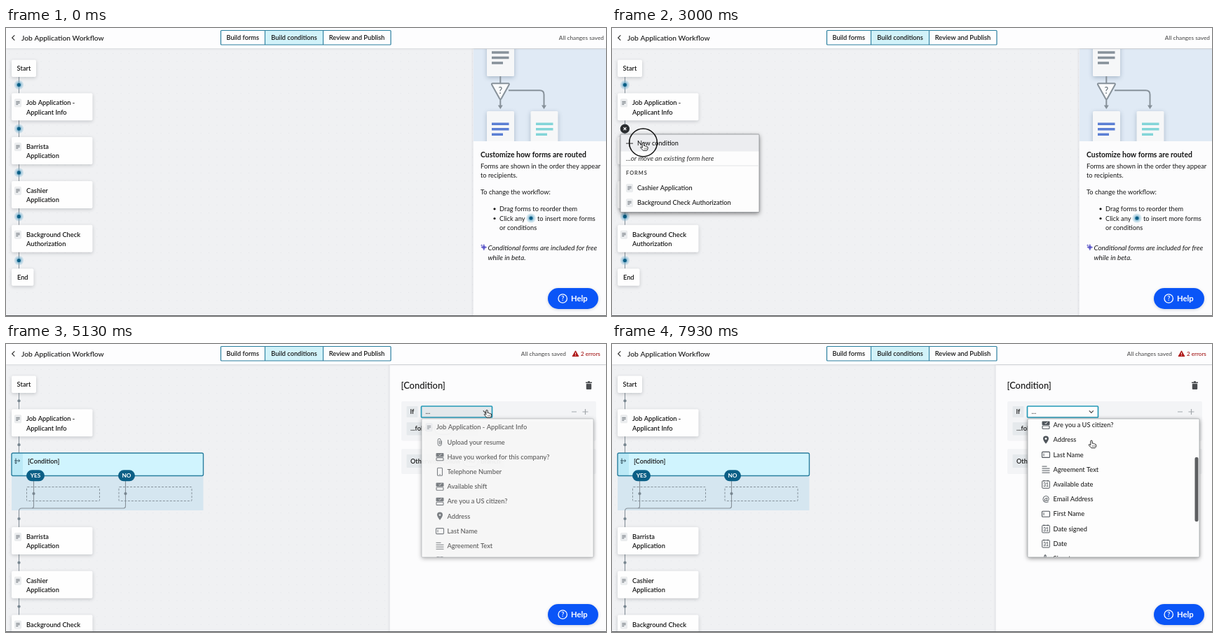
An HTML page with a canvas for the animation above (8 s loop, 856 px wide and 412 px high).

```html
<!DOCTYPE html>
<html lang="en">
<head>
<meta charset="utf-8">
<title>Form workflow</title>
<style>
html, body { margin: 0; width: 100%; height: 100%; overflow: hidden; background: #f0f1f3; }
canvas { display: block; width: 856px; height: 412px; }
</style>
</head>
<body>
<canvas id="stage"></canvas>
<script>
const W = 856, H = 412, LOOP = 8000;
const canvas = document.getElementById('stage');
const ratio = window.devicePixelRatio || 1;
canvas.width = W * ratio;
canvas.height = H * ratio;
const c = canvas.getContext('2d');

const INK = '#151515', GREY = '#87919a', TEAL = '#0b5f86', EDGE = '#2a7f9f';
const ROW = 21.2;
const clamp = v => Math.min(1, Math.max(0, v));
const smooth = v => v * v * (3 - 2 * v);
const progress = (t, from, to) => clamp((t - from) / (to - from));

// Interpolates between keys of the form [time, ...values].
function track(t, keys, ease = smooth) {
  const i = keys.findIndex(k => k[0] > t);
  if (i === 0) return keys[0].slice(1);
  if (i < 0) return keys[keys.length - 1].slice(1);
  const a = keys[i - 1], b = keys[i], p = ease(progress(t, a[0], b[0]));
  return a.slice(1).map((v, n) => v + (b[n + 1] - v) * p);
}

const POINTER = [[600, -10, 250], [1400, 17, 144], [2040, 17, 144], [2670, 44.5, 164.5],
  [3870, 44.5, 164.5], [4700, 686, 94.5], [5600, 686, 94.5], [6300, 682, 122],
  [7200, 682, 122], [7800, 684, 138]];
const SCROLL = [[6900, 0], [7130, 32.7], [7700, 106], [7930, 109.2]];
const CLICKS = [1600, 2990, 4860];

function text(str, x, cy, size = 9.25, weight = 400, color = INK, align = 'left') {
  c.font = `${weight} ${size}px Lato, sans-serif`;
  c.fillStyle = color;
  c.textAlign = align;
  c.fillText(str, x, cy + size * 0.34);
}
function box(x, y, w, h, fill, r = 0, stroke, lw = 1) {
  c.beginPath();
  c.roundRect(x, y, w, h, r);
  if (fill) { c.fillStyle = fill; c.fill(); }
  if (stroke) { c.strokeStyle = stroke; c.lineWidth = lw; c.stroke(); }
}
function shadowed(x, y, w, h, fill, r, color, blur, dy) {
  c.save();
  c.shadowColor = color;
  c.shadowBlur = blur * ratio;
  c.shadowOffsetY = dy * ratio;
  box(x, y, w, h, fill, r);
  c.restore();
}
function path(d, stroke, lw = 1, fill) {
  const p = new Path2D(d);
  if (fill) { c.fillStyle = fill; c.fill(p); }
  if (stroke) { c.strokeStyle = stroke; c.lineWidth = lw; c.stroke(p); }
}
function disc(x, y, r, fill, stroke, lw = 1) {
  c.beginPath();
  c.arc(x, y, r, 0, Math.PI * 2);
  if (fill) { c.fillStyle = fill; c.fill(); }
  if (stroke) { c.strokeStyle = stroke; c.lineWidth = lw; c.stroke(); }
}
function at(x, y, draw) {
  c.save();
  c.translate(x, y);
  draw();
  c.restore();
}
function faded(alpha, draw) {
  if (alpha <= 0) return;
  c.save();
  c.globalAlpha = alpha;
  draw();
  c.restore();
}

function formIcon(x, y) {
  box(x - 4.5, y - 5.5, 9, 11, '#eceef0', 1, '#dfe2e5', 0.6);
  path(`M${x - 2.7} ${y - 2}h5.4M${x - 2.7} ${y}h5.4M${x - 2.7} ${y + 2}h3`, '#5c646b', 0.9);
}
function insertDot(x, y) {
  disc(x, y, 6.6, 'rgba(120,180,208,.32)');
  disc(x, y, 4.5, 'rgba(90,160,195,.4)');
  disc(x, y, 2.6, TEAL);
}
function card(y, lines) {
  shadowed(8, y, 115.5, 39, '#fefefe', 2, 'rgba(40,50,60,.22)', 5, 1.5);
  formIcon(17, y + 14);
  lines.forEach((line, i) => text(line, 29, y + 14 + i * 13.2, 9.3, 600));
}
function endCap(label, y, w) {
  shadowed(8, y, w, 24.5, '#fefefe', 2, 'rgba(40,50,60,.22)', 5, 1.5);
  text(label, 8 + w / 2, y + 12.3, 9.3, 600, INK, 'center');
}
function pill(label, x, y, w, fill, stroke, color) {
  box(x - w / 2, y - 8, w, 16, fill, 8, stroke, 1);
  text(label, x, y, 8.3, 700, color, 'center');
}

function backdrop() {
  c.fillStyle = '#f0f1f3';
  c.fillRect(0, 0, W, H);
  c.fillStyle = '#e3e5e8';
  for (let y = 36; y < H; y += 11.4)
    for (let x = 4; x < 670; x += 11.4) c.fillRect(x, y, 1, 1);
}

function header(t) {
  shadowed(0, -4, W, 33, '#fdfdfe', 0, 'rgba(30,40,50,.16)', 3, 0.5);
  path('M12.3 10.3l-3.6 3.7 3.6 3.7', '#333', 1.2);
  text('Job Application Workflow', 22, 14, 10.3, 500);
  box(369.5, 3.5, 83, 20.5, '#d1f2f9');
  box(306.5, 3.5, 242.5, 20.5, null, 1, EDGE, 1.2);
  path('M369.5 3.5v20.5M452.5 3.5v20.5', EDGE, 1.1);
  text('Build forms', 337.7, 14, 9.2, 600, INK, 'center');
  text('Build conditions', 411, 14, 9.2, 600, INK, 'center');
  text('Review and Publish', 500.5, 14, 9.3, 600, INK, 'center');
  const saving = t >= 3330 && t < 4000, errors = t >= 4000;
  text(saving ? 'Saving...' : 'All changes saved', errors ? 799 : 853, 14, 8.3, 400, '#444', 'right');
  if (errors) {
    path('M812.5 9.8l4.4 7.8h-8.8z', '#b01c1c', 1, '#b01c1c');
    path('M812.5 12.3v2.6M812.5 15.8v1', '#fff', 0.9);
    text('2 errors', 820, 14, 8.1, 500, '#a31515');
  }
}

const FORMS = [['Job Application -', 'Applicant Info'], ['Barrista', 'Application'],
  ['Cashier', 'Application'], ['Background Check', 'Authorization']];

function flow(t) {
  path('M18.5 70V344', GREY, 1);
  endCap('Start', 45.5, 35);
  FORMS.forEach((lines, i) => card(93.3 + i * 62.8, lines));
  endCap('End', 344.2, 31.5);
  for (let i = 0; i < 5; i++) insertDot(18.4, 81.3 + i * 62.8);
  if (t > 1330) toggle(t);
}

function toggle(t) {
  disc(18.4, 144.2, 6.6, '#2b2d30');
  at(18.4, 144.2, () => {
    c.rotate(Math.PI / 4 * progress(t, 1680, 1850));
    path('M-2.7 0h5.4M0 -2.7v5.4', '#fff', 1.2);
  });
}

function branchedFlow() {
  path('M18.5 70V156', GREY, 1);
  endCap('Start', 45.5, 35);
  card(93.3, FORMS[0]);
  box(8, 188, 273.5, 50, '#d5e6f0');
  path('M39.5 196V232Q39.5 235 36.5 235M170.5 196V232Q170.5 235 167.5 235H22.5Q18.5 235 18.5 239V412', GREY, 1.1);
  c.setLineDash([3, 2]);
  box(29.5, 204.5, 104, 20, null, 1, '#7e8b94', 0.9);
  box(161, 204.5, 104, 20, null, 1, '#7e8b94', 0.9);
  c.setLineDash([]);
  box(8, 156, 273.5, 32.5, '#d0f4fe', 2);
  box(8, 156, 16, 32.5, '#bce9f6', 2);
  box(8, 156, 273.5, 32.5, null, 2, EDGE, 1.4);
  path('M12 167h7.5M17.8 165.2l1.9 1.8-1.9 1.8M14 163.5v7.5M12.5 169.6l1.5 1.6 1.5-1.6', '#33505e', 1);
  text('[Condition]', 31, 168, 9.2, 600);
  pill('YES', 42, 188.3, 26, TEAL, null, '#fff');
  pill('NO', 172, 188.3, 24, TEAL, null, '#fff');
  FORMS.slice(1).forEach((lines, i) => card(262 + i * 62.8, lines));
  [[39.5, 214], [170.5, 214], [18.5, 81.3], [18.5, 144.2], [18.5, 250], [18.5, 312.8], [18.5, 375.6]]
    .forEach(([x, y]) => disc(x, y, 2.1, '#77858f'));
}

function menu(alpha) {
  faded(alpha, () => {
    shadowed(12, 152, 198, 111.5, '#fdfdfd', 1, 'rgba(0,0,0,.5)', 6, 2);
    box(12, 152, 198, 24.5, '#ecedf0');
    box(12, 152, 198, 111.5, null, 1, '#8b8f93', 0.8);
    path('M20 165.2h10M25 160.2v10', '#555', 1.2);
    text('New condition', 36, 165.2, 9.1, 500);
    text('...or move an existing form here', 20, 186.5, 9.7, 'italic 400', '#333');
    path('M12 197h198', '#dcdee0', 0.8);
    c.letterSpacing = '1px';
    text('FORMS', 20, 207.5, 7.4, 700, '#444');
    c.letterSpacing = '0px';
    formIcon(25, 229);
    formIcon(25, 250.2);
    text('Cashier Application', 36, 229, 9.2, 500);
    text('Background Check Authorization', 36, 250.2, 9.2, 500);
  });
}

function panelBack(x) {
  shadowed(x, 30, W - x + 10, H, '#fcfcfd', 0, 'rgba(30,40,50,.2)', 4, 0);
}

function stripes(x, y, color) {
  path(`M${x} ${y}h24.5M${x} ${y + 7.5}h24.5M${x} ${y + 15}h16`, color, 3.4);
}
function illustration() {
  c.save();
  c.beginPath();
  c.rect(667, 30, 189, 132);
  c.clip();
  box(667, 30, 189, 132, '#e0eaf5');
  [[686, 10, 59], [686, 119, 60], [748.5, 119, 60]].forEach(([x, y, h]) =>
    shadowed(x, y, 39, h, '#f6f7f8', 1.5, 'rgba(40,70,100,.3)', 6, 2));
  stripes(693, 35, GREY);
  stripes(693, 137.3, '#5b7fd4');
  stripes(756, 137.3, '#83d5d8');
  path('M705.3 69v11M705.3 102v10M717 89.3h44.5q6 0 6 6V112', GREY, 2);
  path('M701.8 110.5h7l-3.5 5.5zM764 110.5h7l-3.5 5.5z', null, 1, GREY);
  c.lineJoin = 'round';
  path('M694.5 79.2h21.8q2.4 0 1.2 2.2l-10.6 19.2q-1.5 2.4-3 0l-10.6-19.2q-1.2-2.2 1.2-2.2z', GREY, 2, '#fafbfc');
  text('?', 705.3, 89.3, 12.5, 500, '#5f6a73', 'center');
  c.restore();
}

function introPanel() {
  panelBack(666.5);
  illustration();
  text('Customize how forms are routed', 677, 181, 10.4, 700);
  text('Forms are shown in the order they appear', 677, 197.8, 9.35);
  text('to recipients.', 677, 211);
  text('To change the workflow:', 677, 235);
  disc(697, 258.8, 1.6, INK);
  disc(697, 272.5, 1.6, INK);
  text('Drag forms to reorder them', 704, 258.7, 9.2);
  text('Click any', 704, 272.5);
  insertDot(749, 272);
  text('to insert more forms', 758, 272.5);
  text('or conditions', 704, 286);
  path('M681.8 309.5q.3 3.7 3.9 4.2q-3.6.5-3.9 4.2q-.3-3.7-3.9-4.2q3.6-.5 3.9-4.2zM678.7 309.5v3M677.2 311h3', '#5a55c8', 0.7, '#5a55c8');
  text('Conditional forms are included for free', 687.5, 315, 9.8, 'italic 400');
  text('while in beta.', 687.5, 328.5, 9.8, 'italic 400');
}

const ITEMS = [['clip', 'Upload your resume'], ['choice', 'Have you worked for this company?'],
  ['phone', 'Telephone Number'], ['choice', 'Available shift'], ['choice', 'Are you a US citizen?'],
  ['pin', 'Address'], ['field', 'Last Name'], ['lines', 'Agreement Text'], ['date', 'Available date'],
  ['mail', 'Email Address'], ['field', 'First Name'], ['date', 'Date signed'], ['date', 'Date'],
  ['pen', 'Signature']];
const MARK = '#50565c';
const ICONS = {
  clip: () => path('M2.5 -2V2.5a2.7 2.7 0 0 1 -5.4 0V-3a2 2 0 0 1 4 0V2a.9 .9 0 0 1 -1.8 0V-2', MARK, 1),
  choice() {
    box(-5.5, -5.5, 11, 5.5, MARK, 1);
    path('M-1.5 -3l1.3 1.3 2.5-2.8', '#fff', 1);
    box(-5, 1, 10, 4.2, null, 1, MARK, 1.1);
  },
  phone() {
    box(-3.5, -5.5, 7, 11, null, 1, MARK, 1.1);
    path('M-1 4h2', MARK, 0.8);
  },
  pin() {
    path('M0 5.5Q-4 .5 -4 -1.8a4 4 0 0 1 8 0Q4 .5 0 5.5z', null, 1, MARK);
    disc(0, -1.7, 1.4, '#fff');
  },
  field() {
    box(-5.5, -4, 11, 8, null, 1, MARK, 1.1);
    path('M-3 -2v4', MARK, 1);
  },
  lines: () => path('M-5.5 -4.5h7M-5.5 -1.5h11M-5.5 1.5h11M-5.5 4.5h11', MARK, 1),
  date() {
    box(-5.3, -5, 10.6, 10.5, null, 1, MARK, 1);
    path('M-2.8 -6v2M2.8 -6v2', MARK, 1);
    text('31', 0, 1, 6.5, 700, MARK, 'center');
  },
  mail: () => text('@', 0, -0.3, 12, 600, MARK, 'center'),
  pen: () => path('M-5 4Q-1 3 0 -2Q.5 -5 -1 -5Q-3 -4 -1.5 1Q0 5 2 2Q3 1 3.5 3L5.5 3', MARK, 1.1)
};

function dropdown(t) {
  const scroll = track(t, SCROLL, v => v)[0];
  // Hover lags slightly behind the scroll.
  const hovered = Math.round((track(t, POINTER)[2] + track(t - 80, SCROLL, v => v)[0] - 140.4) / ROW);
  faded(progress(t, 5050, 5160), () => {
    shadowed(593, 107, 245, 198, '#fdfdfd', 1, 'rgba(0,0,0,.45)', 6, 1.5);
    box(593, 107, 245, 198, '#fdfdfd', 1, '#a0a4a8', 0.7);
    c.save();
    c.beginPath();
    c.rect(593.4, 107.4, 244, 197.4);
    c.clip();
    const top = 119.2 - scroll;
    formIcon(603.5, top);
    text('Job Application - Applicant Info', 614, top, 9.3, 600, '#333');
    ITEMS.forEach(([icon, label], i) => {
      const y = top + ROW * (i + 1);
      if (y > 320 || y < 90) return;
      if (i === hovered && t > 5700) box(593, y - ROW / 2, 245, ROW, '#eeeff0');
      at(619, y, ICONS[icon]);
      text(label, 629.5, y, 9.25, 500, '#222');
    });
    faded(progress(t, 6880, 6960), () => box(831.5, 109.2 + scroll * 0.484, 5, 92, '#5d5f61', 2));
    c.restore();
  });
}

function conditionPanel(t) {
  const shift = 119 * (1 - smooth(progress(t, 3330, 3530)));
  const active = t > 4920;
  at(shift, 0, () => {
    panelBack(547.5);
    if (!active) box(558, 46, 260, 27, '#fff', 1, EDGE, 1.5);
    text('[Condition]', 563.5, 59.5, 12.9, 500);
    if (!active && (t - 3400) % 1000 < 550) path('M628.5 53v13', INK, 0.9);
    path('M827 55.2h9M830 54h3', '#4a4d50', 1.5);
    box(827.8, 56.8, 7.4, 8.2, '#4a4d50', 1);
    box(564, 82, 278, 56.5, '#f3f4f6', 2);
    box(564, 150, 278, 36, '#f3f4f6', 2);
    box(571.5, 89, 16, 16, '#e5e9ec', 1);
    text('If', 579.5, 97, 9.3, 600, INK, 'center');
    const pressed = active && t < 5250;
    box(592.5, 89, 101, 16, pressed ? '#e3e8eb' : '#fdfdfd', 1, active ? '#259ab8' : '#8b9298', active ? 1.7 : 0.9);
    text('...', 598.5, 97, 9.3, 500, '#333');
    path('M680.8 95.4l3 3 3-3', '#444', 1.2);
    if (t >= 4000) path('M807 97h7M822.5 97h8M826.5 93v8', '#a2a7ab', 1.2);
    box(571.5, 112, 102.5, 18.5, '#e5e9ec', 1);
    text('...follow', 577, 121.2, 9.2, 600);
    pill('YES', 624.3, 121.2, 25.5, '#f4f5f6', '#70777d', '#444');
    text('branch', 640.5, 121.2, 9.2, 600);
    box(571.5, 158, 140, 19, '#e5e9ec', 1);
    text('Otherwise, follow', 577, 167.5, 9.1, 600);
    pill('NO', 663, 167.5, 22, '#f4f5f6', '#70777d', '#444');
    text('branch', 677.5, 167.5, 9.2, 600);
  });
  dropdown(t);
}

function helpButton() {
  shadowed(773, 372, 72, 30, '#0a55f7', 15, 'rgba(0,30,90,.2)', 4, 1);
  disc(794.2, 387, 6.2, null, '#fff', 1.3);
  text('?', 794.2, 387, 9, 700, '#fff', 'center');
  text('Help', 806, 387, 11.3, 700, '#fff');
}

function pointer(t) {
  const [x, y] = track(t, POINTER);
  for (const start of CLICKS) {
    const p = progress(t, start, start + 220);
    if (p > 0 && p < 1) disc(x, y - 0.5, 20 - 12 * smooth(p), null, '#111', 1.5);
  }
  at(x, y, () => {
    c.lineJoin = 'round';
    path('M-1.2 1.2Q-1.2 0 0 0Q1.2 0 1.2 1.2V4.2Q2.6 3.4 3.2 4.7Q4.4 4.1 4.9 5.3Q6.6 5 6.6 6.5V8Q6.4 9.7 5.2 10.7H0Q-1.8 9.2 -3.6 6.8Q-4 5.3 -2.6 5.6L-1.2 6.8Z', '#111', 0.9, '#fff');
    path('M1.6 7v2M3.2 7v2M4.8 7v2', '#333', 0.6);
  });
}

function draw(t) {
  c.setTransform(ratio, 0, 0, ratio, 0, 0);
  backdrop();
  if (t < 3330) {
    flow(t);
    introPanel();
    menu(Math.min(progress(t, 1720, 1860), 1 - progress(t, 3230, 3330)));
  } else {
    branchedFlow();
    conditionPanel(t);
  }
  header(t);
  helpButton();
  pointer(t);
  box(0, 411, W, 1, '#55585b');
}

const start = performance.now();
function tick() {
  draw((performance.now() - start) % LOOP);
  requestAnimationFrame(tick);
}
tick();
</script>
</body>
</html>
```
